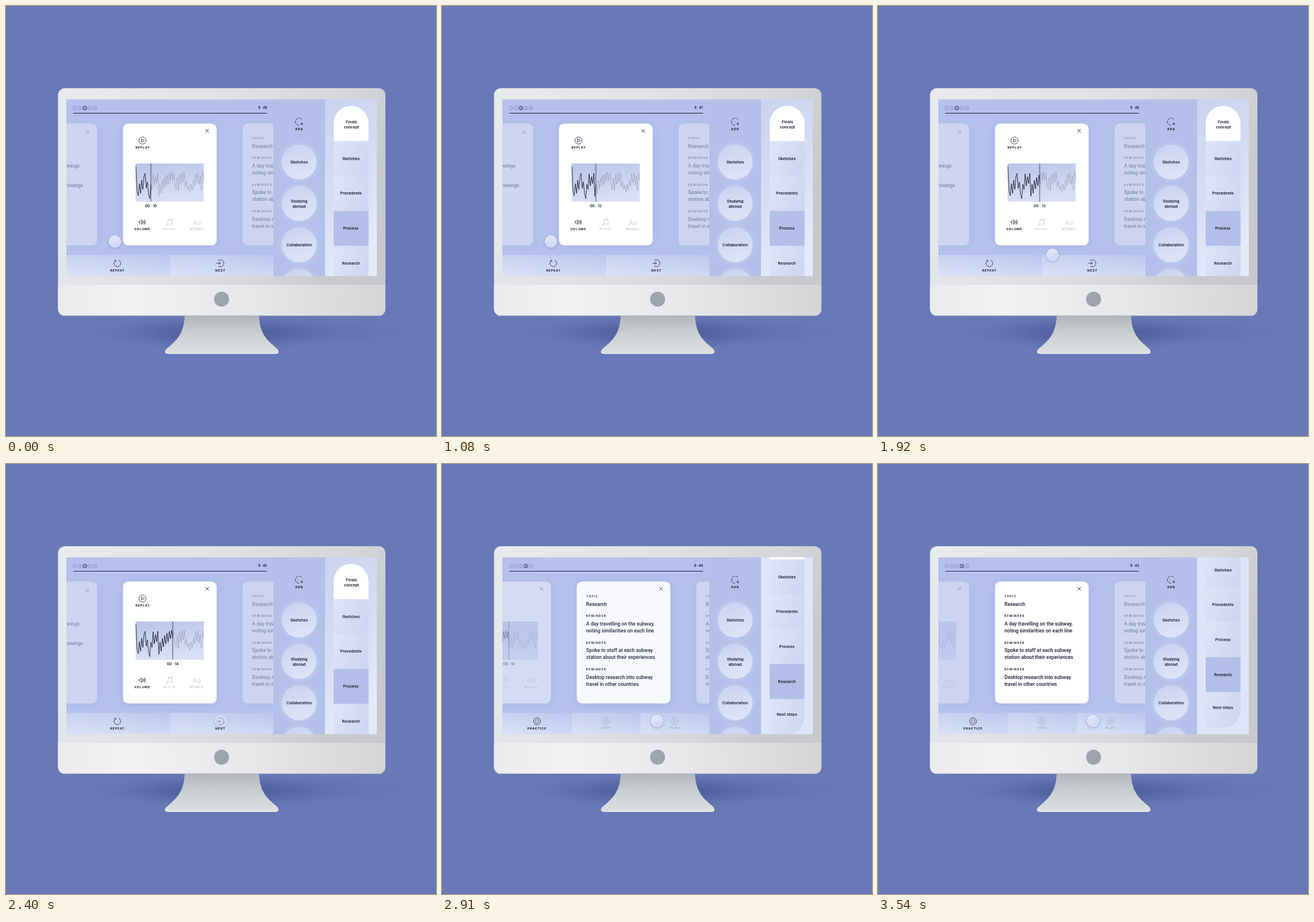
Write an HTML page that moves like this. It is 748x748 px and loops after 3.57 s.

```html
<!DOCTYPE html>
<html lang="en">
<head>
<meta charset="utf-8">
<title>Presentation practice</title>
<style>
html, body { margin: 0; width: 100%; height: 100%; overflow: hidden; background: #6879b7; }
svg { display: block; width: 100%; height: 100%; }
text { font: 500 7.4px Roboto, sans-serif; fill: #161a2e; }
.mid text, text.mid { text-anchor: middle; }
.cap { font: 700 5.4px Inter, sans-serif; letter-spacing: .8px; }
.tag { font: 700 4.8px Inter, sans-serif; letter-spacing: 1.3px; }
.note { font-size: 8.65px; }
.time { font: 700 5.5px Inter, sans-serif; text-anchor: end; }
.count { font: 600 6.4px Inter, sans-serif; text-anchor: middle; }
.num { font: 500 3.6px Inter, sans-serif; text-anchor: middle; }
.line { fill: none; stroke: #161a2e; stroke-width: .8; }
.faint { opacity: .24; }
.sheet { fill: #fff; filter: drop-shadow(0 1px 6px rgba(112, 130, 200, .3)); }
.side { opacity: .32; }

.slide, .scroll, .dim, .lift, .cool, .warm { animation: 3570ms ease infinite; }
.slide { animation-name: slide; }
.scroll { animation-name: scroll; }
.dim { animation-name: dim; }
.lift { animation-name: lift; }
.cool { animation-name: cool; }
.warm { animation-name: warm; }
.head { animation: head 3570ms linear infinite; }
.before { animation: before 3570ms step-end infinite; }
.after { animation: after 3570ms step-end infinite; }
.clock { animation: tick 3570ms step-end infinite; }
.played { animation: count 3570ms step-end infinite; }
.cursor { animation: travel 3570ms ease-in-out infinite, press 3570ms linear infinite; }

@keyframes slide { 0%, 74.42% { transform: translateX(0); } 87.25%, 100% { transform: translateX(-208px); } }
@keyframes scroll { 0%, 74.42% { transform: translateY(0); } 87.25%, 100% { transform: translateY(-81px); } }
@keyframes dim { 0%, 74.42% { opacity: 1; } 87.25%, 100% { opacity: .32; } }
@keyframes lift { 0%, 74.42% { opacity: .32; } 87.25%, 100% { opacity: 1; } }
@keyframes cool { 0%, 75.3% { opacity: 1; } 82%, 100% { opacity: 0; } }
@keyframes warm { 0%, 75.3% { opacity: 0; } 82%, 100% { opacity: 1; } }
@keyframes head {
  0% { transform: translateX(0); }
  20.17% { transform: translateX(10.5px); }
  41.18% { transform: translateX(21px); }
  67.23% { transform: translateX(38px); }
  72.83%, 100% { transform: translateX(41.5px); }
}
@keyframes before { 0% { opacity: 1; } 75.5%, 100% { opacity: 0; } }
@keyframes after { 0% { opacity: 0; } 75.5%, 100% { opacity: 1; } }
@keyframes tick {
  0% { transform: translateY(0); }
  14.29% { transform: translateY(-10px); }
  30.25% { transform: translateY(-20px); }
  46.22% { transform: translateY(-30px); }
  62.18% { transform: translateY(-40px); }
  78.15% { transform: translateY(-50px); }
  94.12%, 100% { transform: translateY(-60px); }
}
@keyframes count {
  0% { transform: translateY(0); }
  14.29% { transform: translateY(-10px); }
  30.25% { transform: translateY(-20px); }
  46.22% { transform: translateY(-30px); }
  62.18%, 100% { transform: translateY(-40px); }
}
@keyframes travel {
  0%, 39.8% { transform: translate(189.5px, 409.5px); }
  64.4%, 100% { transform: translate(374px, 447px); }
}
@keyframes press { 0%, 64.4% { opacity: 1; } 66.5%, 70% { opacity: .5; } 73%, 100% { opacity: 1; } }
</style>
</head>
<body>
<svg viewBox="0 0 748 748">
<defs>
  <linearGradient id="body" x2="1" y2=".35">
    <stop stop-color="#e9eaec"/><stop offset=".45" stop-color="#e1e2e5"/>
    <stop offset=".8" stop-color="#d6d7da"/><stop offset="1" stop-color="#c8c9cc"/>
  </linearGradient>
  <linearGradient id="chin">
    <stop stop-color="#ebebed"/><stop offset=".22" stop-color="#f2f2f4"/>
    <stop offset=".6" stop-color="#e7e7e9"/><stop offset="1" stop-color="#d5d5d7"/>
  </linearGradient>
  <linearGradient id="stand" x2="0" y2="1">
    <stop stop-color="#b0b5bc"/><stop offset=".3" stop-color="#c1c5ca"/>
    <stop offset=".65" stop-color="#d2d5d8"/><stop offset="1" stop-color="#dddfe1"/>
  </linearGradient>
  <radialGradient id="shade">
    <stop stop-color="#414f8b" stop-opacity=".75"/><stop offset=".5" stop-color="#4a5896" stop-opacity=".45"/>
    <stop offset="1" stop-color="#5a69a8" stop-opacity="0"/>
  </radialGradient>
  <linearGradient id="bar">
    <stop stop-color="#c9d3f2"/><stop offset="1" stop-color="#bbc7ee"/>
  </linearGradient>
  <linearGradient id="rise" x2="0" y2="1">
    <stop stop-color="#fff" stop-opacity="0"/><stop offset="1" stop-color="#fff" stop-opacity=".32"/>
  </linearGradient>
  <linearGradient id="plot" x2=".3" y2="1">
    <stop stop-color="#b8c3e8"/><stop offset="1" stop-color="#d9dff4"/>
  </linearGradient>
  <linearGradient id="ball" x2=".3" y2="1">
    <stop stop-color="#c9d2f0"/><stop offset="1" stop-color="#dde3f7"/>
  </linearGradient>
  <linearGradient id="rail" x2=".3" y2="1">
    <stop stop-color="#cbd2ee"/><stop offset=".5" stop-color="#d5dcf4"/><stop offset="1" stop-color="#e5eafa"/>
  </linearGradient>
  <linearGradient id="cell" x2="1" y2=".4">
    <stop stop-color="#dfe5f8"/><stop offset="1" stop-color="#cfd7f2"/>
  </linearGradient>
  <linearGradient id="knob" x2=".4" y2="1">
    <stop stop-color="#e6ebfa"/><stop offset="1" stop-color="#cfd8f3"/>
  </linearGradient>
  <filter id="glow" x="-30%" y="-30%" width="160%" height="160%"><feGaussianBlur stdDeviation="5"/></filter>
  <clipPath id="screen"><rect x="105" y="162.5" width="540" height="307.5"/></clipPath>
  <clipPath id="stage"><rect x="105" y="162.5" width="360" height="307.5"/></clipPath>
  <clipPath id="past"><rect class="head" x="152" y="270" width="100" height="74"/></clipPath>
  <clipPath id="timeBox"><rect x="430" y="173" width="30" height="9"/></clipPath>
  <clipPath id="countBox"><rect x="232" y="342.5" width="40" height="9.5"/></clipPath>

  <path id="close" class="line" d="M347 214l6 6m0-6l-6 6"/>
  <g id="notes">
    <rect class="sheet" x="203.5" y="204.5" width="163" height="212" rx="9"/>
    <use href="#close"/>
    <text class="tag" x="220" y="231.5">TOPIC</text>
    <text class="note" x="220" y="246.5">Research</text>
    <text class="tag" x="220" y="266">REMINDER</text>
    <text class="note" x="220" y="281">A day travelling on the subway,</text>
    <text class="note" x="220" y="293">noting similarities on each line</text>
    <text class="tag" x="220" y="312.5">REMINDER</text>
    <text class="note" x="220" y="327.3">Spoke to staff at each subway</text>
    <text class="note" x="220" y="339.3">station about their experiences</text>
    <text class="tag" x="220" y="358.7">REMINDER</text>
    <text class="note" x="220" y="373.6">Desktop research into subway</text>
    <text class="note" x="220" y="385.6">travel in other countries</text>
  </g>
  <g id="orb">
    <circle r="32" fill="#d6defa" opacity=".38" filter="url(#glow)"/>
    <circle r="30.3" fill="url(#ball)"/>
  </g>
  <g id="play" class="line"><circle r="6.2"/><path d="M-1.8-3l5 3-5 3z"/></g>
</defs>

<rect width="748" height="748" fill="#6879b7"/>
<ellipse cx="420" cy="567" rx="302" ry="27" fill="url(#shade)" opacity=".45"/>
<ellipse cx="375" cy="569" rx="205" ry="31" fill="url(#shade)"/>
<path fill="url(#stand)" d="M311 537H440C441 559 446 573 461 587L472.500 597Q477 605 468 605.300H283Q273 605 278 597.500L290 587C305 573 310 559 311 537Z"/>
<path fill="none" stroke="#eceded" stroke-width="1.500" d="M278 602Q279 604.300 284 604.300H467Q472 604.300 473 602"/>
<rect x="90.500" y="143" width="569.500" height="396" rx="12" fill="url(#body)"/>
<path fill="url(#chin)" d="M90.500 485H660V527A12 12 0 0 1 648 539H102.500A12 12 0 0 1 90.500 527Z"/>
<path d="M101 538.500H649" stroke="#c4c5c9"/>
<circle cx="375" cy="510" r="13" fill="#9fa3ad"/>

<g clip-path="url(#screen)">
  <rect x="105" y="162" width="360" height="308" fill="#b5c1ec"/>
  <g clip-path="url(#stage)">
    <g id="dots"></g>
    <path d="M117 186.500H454" stroke="#161a2e"/>
    <g clip-path="url(#timeBox)"><g id="clock" class="clock"></g></g>

    <g class="slide">
      <g class="side">
        <rect class="sheet" x="-4.500" y="204.500" width="163" height="212" rx="9"/>
        <use href="#close" x="-208" y="3"/>
        <text class="note" x="128" y="280.500" text-anchor="end">Presentation drawings</text>
        <text class="note" x="134" y="315" text-anchor="end">Comparing old drawings</text>
      </g>
      <g class="dim">
        <rect class="sheet" x="203.500" y="204.500" width="163" height="212" rx="9"/>
        <use href="#close"/>
        <use href="#play" x="237.500" y="234"/>
        <text class="cap mid" x="238" y="248">REPLAY</text>
        <rect x="225.500" y="274" width="118.500" height="66.500" fill="url(#plot)"/>
        <path class="wave line" opacity=".26"/>
        <g clip-path="url(#past)"><path class="wave line"/></g>
        <g class="head">
          <path d="M252 274V340.500" stroke="#161a2e" stroke-width=".8"/>
          <g clip-path="url(#countBox)"><g id="played" class="played"></g></g>
        </g>
        <path class="line" d="M231.500 374.500h2l3-2.500v8l-3-2.500h-2zM238 374q1.300 2 0 4m1.700-5.200q2 3.200 0 6.400m1.600-7.400q2.600 4.200 0 8.400"/>
        <text class="cap mid" x="237" y="390">VOLUME</text>
        <g class="faint">
          <path class="line" d="M282 380.500v-9.500l7-1v9.500M282 373l7-1"/>
          <circle class="line" cx="280.500" cy="380.500" r="1.600"/><circle class="line" cx="287.500" cy="379.500" r="1.600"/>
          <text class="cap mid" x="284.300" y="390">PITCH</text>
          <text class="mid" x="332" y="380.500" style="font:300 12px Inter,sans-serif">Aa</text>
          <text class="cap mid" x="331.800" y="390">WORDS</text>
        </g>
      </g>
      <use class="lift" href="#notes" x="208"/>
      <use class="side" href="#notes" x="416"/>
    </g>

    <g class="before mid">
      <rect x="105" y="433" width="180.500" height="37" fill="url(#bar)"/>
      <rect x="285.500" y="433" width="180" height="37" fill="url(#bar)"/>
      <rect x="105" y="433" width="360" height="37" fill="url(#rise)"/>
      <path class="line" d="M190.500 442.800A5.800 5.800 0 1 0 196 442.300M188.500 442.300h2.500v2.700"/>
      <text class="cap" x="194" y="462.300">REPEAT</text>
      <path class="line" d="M369 443A6 6 0 1 1 369 452M366 447.500h7m-2.500-2.500l2.500 2.500l-2.500 2.500"/>
      <text class="cap" x="373" y="462.300">NEXT</text>
    </g>
    <g class="after mid">
      <rect x="105" y="433" width="120.500" height="37" fill="url(#bar)"/>
      <rect x="225.500" y="433" width="120" height="37" fill="url(#bar)"/>
      <rect x="345.500" y="433" width="120" height="37" fill="url(#bar)"/>
      <rect x="105" y="433" width="360" height="37" fill="url(#rise)"/>
      <g class="line"><circle cx="165.300" cy="447.500" r="6"/><circle cx="165.300" cy="447.500" r="3" stroke-dasharray="3.700 1"/></g>
      <text class="cap" x="165.300" y="461.700">PRACTICE</text>
      <g class="faint">
        <g class="line"><circle cx="285.300" cy="447.500" r="6"/><path d="M283.500 444.800v5.400h3.600v-5.400z"/></g>
        <text class="cap" x="285.300" y="461.200">STOP</text>
        <use href="#play" x="405" y="447.500"/>
        <text class="cap" x="405" y="461.200">PLAY</text>
      </g>
    </g>
    <g class="cursor">
      <circle r="10.300" fill="url(#knob)" stroke="#f1f4fd" stroke-width=".8" style="filter:drop-shadow(0 1px 2px rgba(90,105,170,.6))"/>
    </g>
  </g>

  <rect x="465" y="162" width="90" height="308" fill="#b4c0ea"/>
  <path class="line" stroke-dasharray="5 1.500" d="M514.500 197A6.300 6.300 0 1 0 510 207.500"/>
  <path class="line" d="M514.500 202.500v5m-2.500-2.500h5"/>
  <g class="mid">
    <text class="cap" x="510" y="216.300">ADD</text>
    <use href="#orb" x="510" y="271.500"/><use href="#orb" x="510" y="343.500"/>
    <use href="#orb" x="510" y="415.500"/><use href="#orb" x="510" y="487.500"/>
    <text x="510" y="274">Sketches</text>
    <text x="510" y="341.700">Studying</text>
    <text x="510" y="350.900">abroad</text>
    <text x="510" y="418">Collaboration</text>
  </g>

  <rect x="555" y="162" width="90" height="308" fill="url(#rail)"/>
  <rect class="warm" x="555" y="162" width="90" height="308" fill="#dfe5f9"/>
  <g class="scroll mid">
    <path d="M570 235V204A30.300 30.300 0 0 1 630.600 204V235Z" fill="#fff"/>
    <rect x="570" y="235" width="60.600" height="60.700" fill="url(#cell)"/>
    <rect x="570" y="295.700" width="60.600" height="60.700" fill="url(#cell)"/>
    <rect x="570" y="356.400" width="60.600" height="60.700" fill="url(#cell)"/>
    <rect x="570" y="417.100" width="60.600" height="60.700" fill="url(#cell)"/>
    <path d="M570 477.800H630.600V509A30.300 30.300 0 0 1 600.300 539.300H570Z" fill="url(#cell)"/>
    <rect class="cool" x="570" y="356.400" width="60.600" height="60.700" fill="#b3bfe9"/>
    <rect class="warm" x="570" y="417.100" width="60.600" height="60.700" fill="#b3bfe9"/>
    <text x="601" y="204">Finals</text>
    <text x="601" y="213.200">concept</text>
    <text x="600" y="267.500">Sketches</text>
    <text x="600" y="328.300">Precedents</text>
    <text x="600" y="389">Process</text>
    <text x="600" y="449.700">Research</text>
    <text x="600" y="506.500">Next steps</text>
  </g>
</g>
</svg>
<script>
const ys = [279, 322, 330, 309, 326, 303, 319, 297, 291, 317, 306, 327, 335, 310, 319, 292,
  313, 297, 309, 291, 331, 310, 326, 303, 318, 298, 313, 294, 310, 291, 304, 289,
  303, 291, 312, 320, 299, 321, 293, 310, 290, 306, 290, 315, 305, 319, 312, 323,
  310, 320, 303, 313, 292, 308, 290, 311, 295, 321, 290, 303];
const d = 'M' + ys.map((y, i) => `${226 + 2 * i} ${y}`).join('L');
document.querySelectorAll('.wave').forEach(p => p.setAttribute('d', d));

// Stacks of readings, one row per tick
const rows = (id, cls, n, x, y, label) => {
  document.getElementById(id).innerHTML = Array.from({ length: n }, (_, i) =>
    `<text class="${cls}" x="${x}" y="${y + 10 * i}">${label(i)}</text>`).join('');
};
rows('clock', 'time', 7, 454, 179, i => `9 : ${49 - i}`);
rows('played', 'count', 5, 252, 349.7, i => `00 : ${10 + i}`);

const dot = (i, cls) => {
  const x = 120 + 8.65 * i;
  return `<g class="${cls}"><circle class="line" cx="${x}" cy="177.5" r="3.2"/>` +
    `<text class="num" x="${x}" y="178.8">${i + 1}</text></g>`;
};
document.getElementById('dots').innerHTML =
  [0, 1, 2, 3, 4].map(i => dot(i, 'side')).join('') + dot(2, 'cool') + dot(3, 'warm');
</script>
</body>
</html>
```
